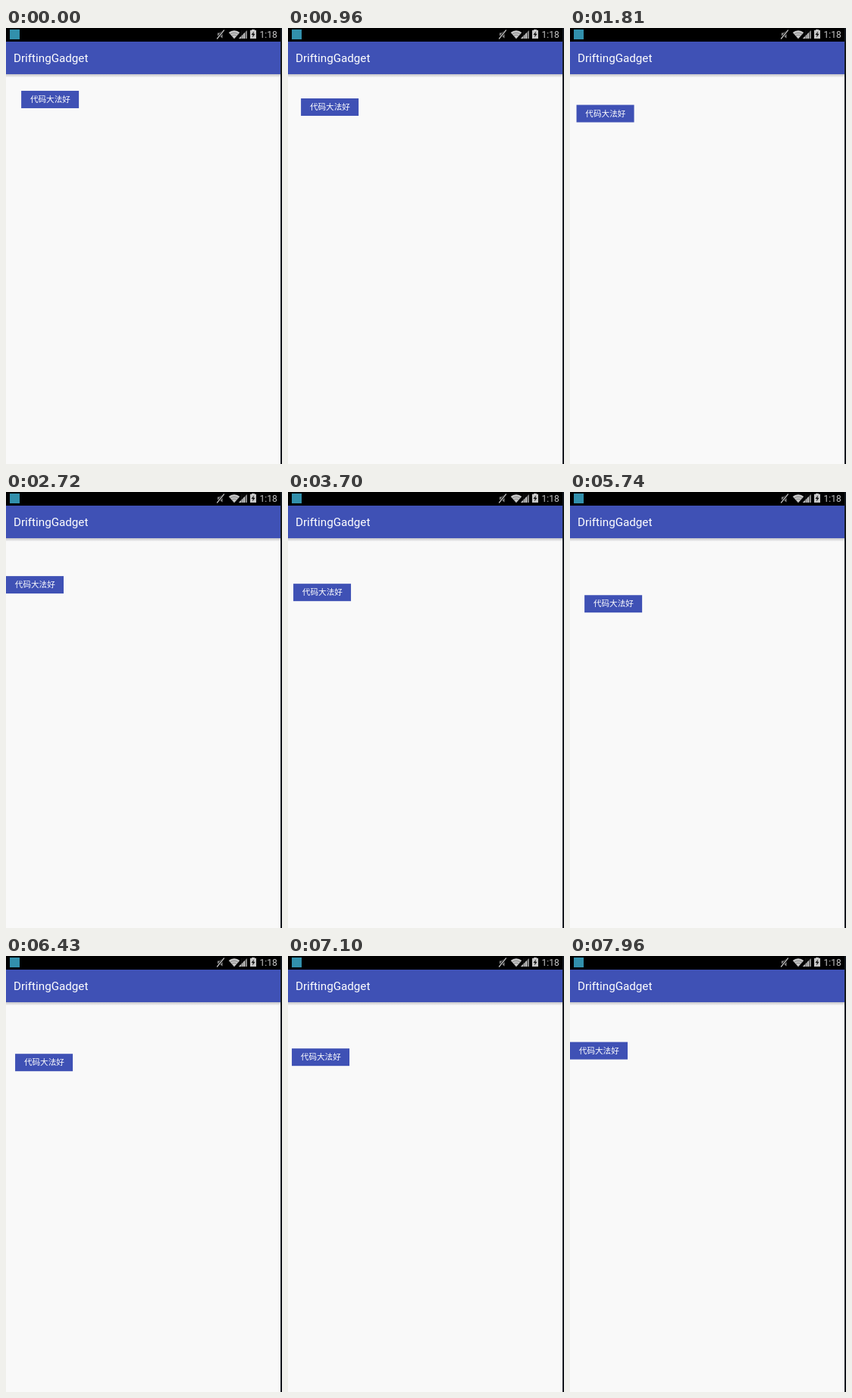
Animation of 364x576 px, one loop 8000 ms. Source, as an HTML page with a canvas:

```html
<!DOCTYPE html>
<html lang="zh-CN">
<head>
<meta charset="utf-8">
<title>Drifting button</title>
<style>
  html, body {
    margin: 0;
    width: 100%;
    height: 100%;
    overflow: hidden;
    background: #f9f9f9;
  }
  #stage {
    position: relative;
    width: 364px;
    height: 576px;
    overflow: hidden;
  }
  #stage > * {
    position: absolute;
    left: 0;
    top: 0;
    white-space: nowrap;
  }
  canvas {
    width: 364px;
    height: 576px;
  }
  #title {
    left: 10px;
    top: 29px;
    font: 15.2px/22px Roboto, sans-serif;
    color: #fff;
  }
  #clock {
    left: 334.5px;
    top: 2px;
    font: 12px/14px Roboto, sans-serif;
    color: #c8c8c8;
  }
  #button {
    width: 76px;
    height: 22.6px;
    background: #3f51b5;
    color: #fff;
    font: 10.6px/22.6px "Noto Sans CJK SC", "Noto Sans CJK", sans-serif;
    text-align: center;
    text-indent: 0.6px;
  }
</style>
</head>
<body>
<div id="stage">
  <canvas id="screen"></canvas>
  <div id="title">DriftingGadget</div>
  <div id="clock">1:18</div>
  <div id="button">代码大法好</div>
</div>
<script>
const W = 364, H = 576, LOOP = 8000;
const PX = 362 / 720;     // one device pixel on the stage
const PX_MS = 48.6;       // drift time per device pixel
const TICK = 136.5;       // screen refresh
const canvas = document.getElementById('screen');
const button = document.getElementById('button');
const ctx = canvas.getContext('2d');

function rect(x, y, w, h, fill) {
  ctx.fillStyle = fill;
  ctx.fillRect(x, y, w, h);
}

function poly(points, fill) {
  ctx.beginPath();
  points.forEach(([x, y]) => ctx.lineTo(x, y));
  ctx.closePath();
  ctx.fillStyle = fill;
  ctx.fill();
}

function drawMute() {
  poly([[279, 6.5], [281.5, 6.5], [285.5, 3.5], [285.5, 13.5], [281.5, 10.5], [279, 10.5]], '#8a8a8a');
  ctx.lineCap = 'round';
  for (const [width, color] of [[3, '#000'], [1.2, '#c0c0c0']]) {
    ctx.strokeStyle = color;
    ctx.lineWidth = width;
    ctx.beginPath();
    ctx.moveTo(278.5, 14);
    ctx.lineTo(287.5, 3);
    ctx.stroke();
  }
}

function wifiArc(r) {
  ctx.arc(301, 14.2, r, -Math.PI * 0.73, -Math.PI * 0.27);
}

function drawWifi() {
  ctx.beginPath();
  ctx.moveTo(301, 14.2);
  wifiArc(11);
  ctx.fillStyle = '#c8c8c8';
  ctx.fill();
  ctx.strokeStyle = '#555';
  ctx.lineWidth = 0.6;
  for (const r of [5, 8]) {
    ctx.beginPath();
    wifiArc(r);
    ctx.stroke();
  }
}

function drawSignal() {
  poly([[307, 14], [318, 14], [318, 3]], '#888');
  poly([[307, 14], [315, 14], [315, 6]], '#c8c8c8');
  for (let x = 310; x <= 315; x += 2.5) rect(x, 3, 0.6, 11, '#222');
}

function drawBattery() {
  rect(324, 2, 4, 2, '#c8c8c8');
  rect(322, 3, 8, 11, '#c8c8c8');
  poly([[327, 4.5], [323.5, 9], [325.7, 9], [325, 12.5], [328.6, 7.8], [326.4, 7.8]], '#111');
}

function drawScreen() {
  const scale = window.devicePixelRatio || 1;
  canvas.width = W * scale;
  canvas.height = H * scale;
  ctx.scale(scale, scale);

  rect(0, 0, W, H, '#f9f9f9');
  const shadow = ctx.createLinearGradient(0, 61, 0, 65.5);
  shadow.addColorStop(0, '#c4c4c8');
  shadow.addColorStop(1, '#f9f9f9');
  rect(0, 61, W, 5, shadow);
  rect(0, 18, W, 43, '#3f51b5');
  rect(0, 0, W, 18, '#000');
  rect(362, 0, 2, H, '#14181e');

  rect(5, 2, 13, 13, '#3290ac');
  drawMute();
  drawWifi();
  drawSignal();
  drawBattery();
}

// Back and forth between lo and hi at one unit per step
function bounce(start, lo, hi, steps) {
  const span = hi - lo;
  const phase = (start - lo + steps) % (2 * span);
  return lo + span - Math.abs(phase - span);
}

function render(now) {
  const tick = Math.floor((now % LOOP + 20) / TICK);
  const steps = Math.round((tick * TICK + 13) / PX_MS);
  // The left wall lets it overshoot, but the window stays on screen
  const x = PX * Math.max(0, bounce(40, -4, 47, steps));
  const y = PX * bounce(165, 0, 277, steps);
  button.style.transform = `translate(${x.toFixed(2)}px, ${y.toFixed(2)}px)`;
}

drawScreen();
render(0);
let start;
requestAnimationFrame(function loop(now) {
  start ??= now;
  render(now - start);
  requestAnimationFrame(loop);
});
</script>
</body>
</html>
```
